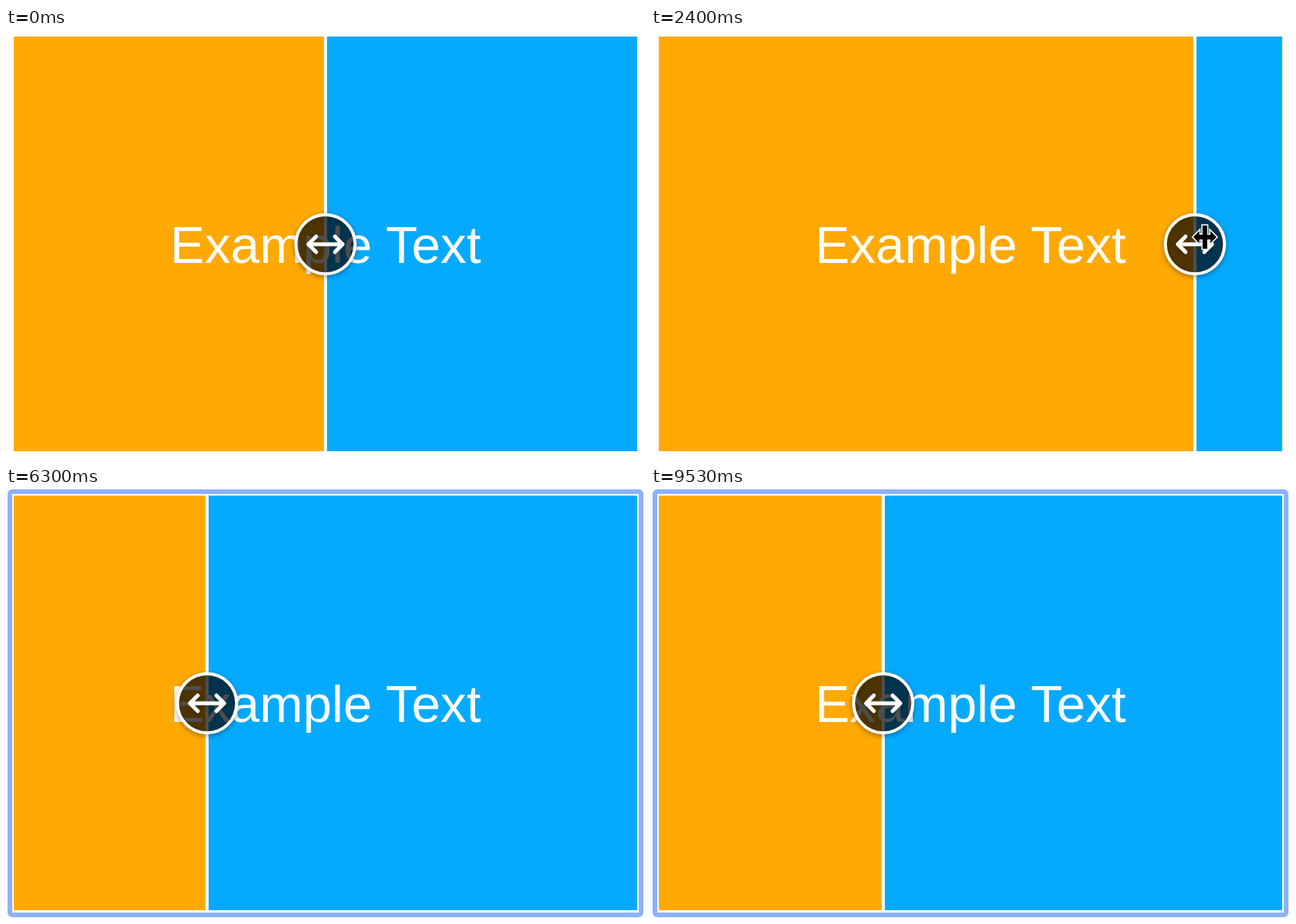
An HTML page for the animation above (9670 ms loop, 820x554 px).

```html
<!DOCTYPE html>
<html lang="en">
<head>
<meta charset="utf-8">
<title>Comparison slider</title>
<style>
  html, body { margin: 0; width: 100%; height: 100%; overflow: hidden; background: #fff; }
  svg { display: block; width: 820px; height: 554px; }
  text { font: 66.67px "Liberation Sans", Arial, sans-serif; fill: #fff; text-anchor: middle; }
  #handle { filter: drop-shadow(0 2px 3px rgba(0, 0, 0, .4)); }
  #arrows { fill: none; stroke: #fff; stroke-width: 5; stroke-linecap: round; stroke-linejoin: round; }
  #cursor { stroke: #fff; stroke-width: 3; paint-order: stroke; }
</style>
</head>
<body>
<svg viewBox="0 0 820 554">
  <clipPath id="stage"><rect x="10" y="11" width="800" height="533"/></clipPath>
  <rect id="focus" x="5" y="6" width="810" height="544" rx="3" fill="none" stroke="#8fb1fb" stroke-width="6"/>
  <g clip-path="url(#stage)">
    <rect x="10" y="11" width="800" height="533" fill="#05aaff"/>
    <rect id="before" x="10" y="11" height="533" fill="#ffa902"/>
    <text x="410" y="302">Example Text</text>
    <g id="divider">
      <rect x="-2" y="11" width="4" height="533" fill="#fff"/>
      <g id="handle" transform="translate(0 278)">
        <circle r="38" fill="#000" fill-opacity=".6" stroke="#fff" stroke-width="4"/>
        <path id="arrows" d="M-21 0H21M-12-10-22 0-12 10M12-10 22 0 12 10"/>
      </g>
    </g>
  </g>
  <path id="cursor" d="M-3-15H3V-3H7V-8L15 0 7 8V3H3V15H-3V3H-7V8L-15 0-7-8V-3H-3Z"/>
</svg>
<script>
  const LOOP = 9670, FRAME = 100, LAST_FRAME = 9530;
  const KEY_REPEAT = 1000 / 12, KEY_STEP = 8;
  const FOCUS_AT = 3150, KEYS_AT = 3300, POINTER_LAG = 40;

  const drag = [[1060, 410], [1750, 137], [2480, 715], [3080, 386]];
  // start time, direction, number of steps
  const keyHolds = [[KEYS_AT, 1, 8], [4360, -1, 38], [8020, 1, 19]];

  const $ = id => document.getElementById(id);
  const clamp = (v, min, max) => Math.min(max, Math.max(min, v));
  const mix = (a, b, p) => a + (b - a) * p;
  const ease = p => (1 - Math.cos(Math.PI * clamp(p, 0, 1))) / 2;

  function dragX(t) {
    let x = drag[0][1];
    for (let i = 1; i < drag.length; i++) {
      const [start] = drag[i - 1], [end, to] = drag[i];
      if (t > start) x = mix(drag[i - 1][1], to, ease((t - start) / (end - start)));
    }
    return x;
  }

  function dividerX(t) {
    return keyHolds.reduce((x, [start, direction, count]) => {
      const steps = clamp(Math.floor((t - start) / KEY_REPEAT) + 1, 0, count);
      return x + direction * steps * KEY_STEP;
    }, Math.round(dragX(t)));
  }

  function cursorPosition(t) {
    const approach = ease((t - FRAME) / 850);
    const x = t < 1000 ? mix(31, 410, approach) : dragX(t + POINTER_LAG);
    const y = t < 1000 ? mix(353, 267, approach) : mix(266, 272, ease((t - 1800) / 1300));
    return [x + (t > 3000 ? 3 : 0), y];
  }

  function draw(t) {
    const x = dividerX(t);
    $("before").setAttribute("width", x - 10);
    $("divider").setAttribute("transform", `translate(${x} 0)`);
    $("cursor").setAttribute("transform", `translate(${cursorPosition(t)})`);
    $("cursor").style.display = t >= FRAME && t < KEYS_AT ? "" : "none";
    $("focus").style.display = t >= FOCUS_AT ? "" : "none";
  }

  const origin = performance.now();
  function tick() {
    const t = (performance.now() - origin) % LOOP;
    draw(t >= LAST_FRAME ? LAST_FRAME : Math.min(9400, Math.floor(t / FRAME) * FRAME));
    requestAnimationFrame(tick);
  }
  tick();
</script>
</body>
</html>
```
